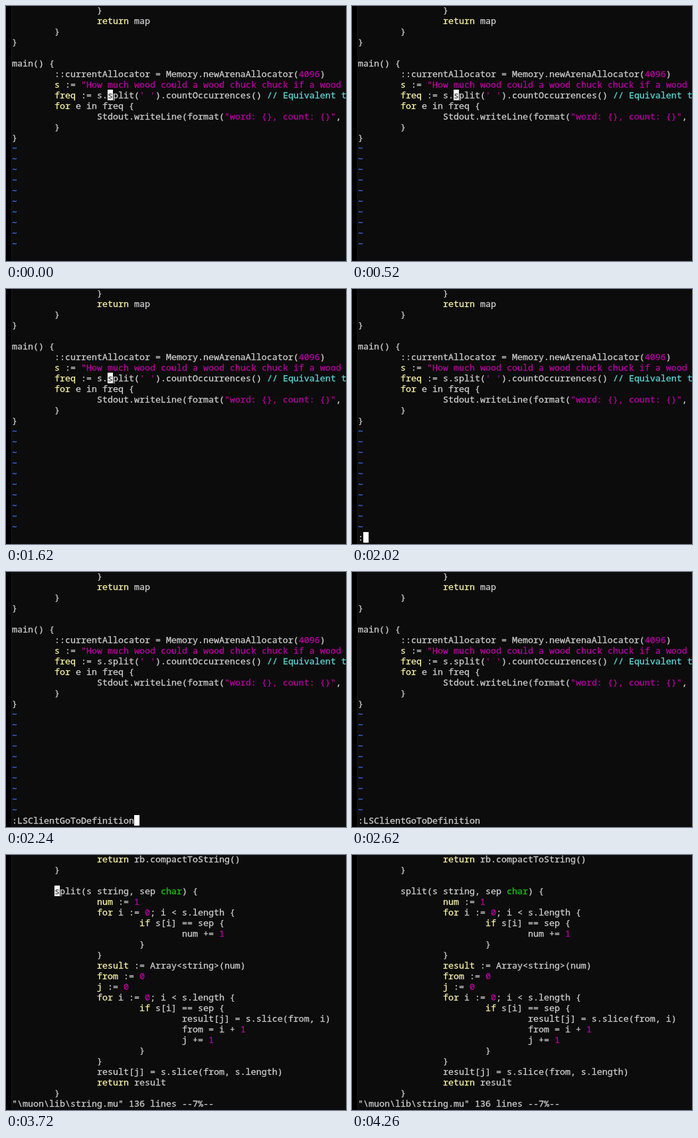
Animation of 512 by 384 pixels, one loop 4490 ms. Source, as an HTML page:

```html
<!DOCTYPE html>
<html lang="en">
<head>
<meta charset="utf-8">
<title>Go to definition</title>
<style>
  html, body { margin: 0; width: 100%; height: 100%; overflow: hidden; background: #0c0c0c; }
  #stage { position: relative; width: 100%; height: 100%; overflow: hidden; contain: strict; background: #0c0c0c; }
  #edge { position: absolute; left: 0; top: 0; width: 8px; height: 100%; background: #000; border-right: 1px solid #181818; }
  pre {
    position: absolute; left: 9px; top: -2px; margin: 0;
    font: 13.3333px/16px "Noto Sans Mono", "DejaVu Sans Mono", monospace;
    font-variant-ligatures: none; tab-size: 8; color: #ccc;
    -webkit-text-stroke: 0.3px;
  }
  #status { top: 366px; }
  #cursor { position: absolute; width: 8px; height: 16px; backdrop-filter: invert(1) brightness(1.06); }
  .constant { color: #b4009e; }
  .comment { color: #61d6d6; }
  .type { color: #16c60c; }
  .statement { color: #f9f1a5; }
  .filler { color: #3b78ff; }
</style>
</head>
<body>
<div id="stage">
<div id="edge"></div>
<pre class="code" id="caller">
		}
		return map
	}
}

main() {
	::currentAllocator = Memory.newArenaAllocator(4096)
	s := "How much wood could a wood chuck chuck if a wood "
	freq := s.split(' ').countOccurrences() // Equivalent to
	for e in freq {
		Stdout.writeLine(format("word: {}, count: {}",
	}
}
~
~
~
~
~
~
~
~
~
~
</pre>
<pre class="code" id="definition">
		return rb.compactToString()
	}

	split(s string, sep char) {
		num := 1
		for i := 0; i &lt; s.length {
			if s[i] == sep {
				num += 1
			}
		}
		result := Array&lt;string&gt;(num)
		from := 0
		j := 0
		for i := 0; i &lt; s.length {
			if s[i] == sep {
				result[j] = s.slice(from, i)
				from = i + 1
				j += 1
			}
		}
		result[j] = s.slice(from, s.length)
		return result
	}
</pre>
<pre id="status"></pre>
<div id="cursor"></div>
</div>
<script>
const LOOP = 4490;
const JUMP = 2860;
const [caller, definition, statusLine, cursor] =
  ["caller", "definition", "status", "cursor"].map(id => document.getElementById(id));

const syntax = new RegExp([
  /(?<constant>"[^"\n]*"|'[^'\n]*'|\b\d+\b)/,
  /(?<comment>\/\/.*)/,
  /(?<type>\bchar\b)/,
  /(?<statement>\b(?:return|for|if)\b|(?<=^\t+)\w+(?= :))/,
  /(?<filler>^~)/
].map(rule => rule.source).join("|"), "gm");

for (const pre of document.querySelectorAll(".code")) {
  pre.innerHTML = pre.innerHTML.replace(syntax, (text, ...rest) => {
    const kind = Object.entries(rest.at(-1)).find(([, match]) => match)[0];
    return `<span class="${kind}">${text}</span>`;
  });
}

// Each entry: start time, cursor column and row (none when blinked off), status text
const command = ":LSClientGoToDefinition";
const fileInfo = String.raw`"\muon\lib\string.mu" 136 lines --7%--`;
const onCall = [18, 8], onName = [8, 3];
const steps = [
  [0, onCall, ""],
  [70, null, ""],
  [520, onCall, ""],
  [1090, null, ""],
  [1620, onCall, ""],
  [2020, [1, 23], ":"],
  [2170, [3, 23], ":LS"],
  [2240, [command.length, 23], command],
  [2620, null, command],
  [JUMP, onName, fileInfo],
  [3160, null, fileInfo],
  [3720, onName, fileInfo],
  [4260, null, fileInfo]
];

function draw(now) {
  const time = now % LOOP;
  const [, cell, status] = steps.findLast(([start]) => start <= time);
  caller.hidden = time >= JUMP;
  definition.hidden = time < JUMP;
  statusLine.textContent = status;
  cursor.hidden = !cell;
  if (cell) {
    cursor.style.left = `${9 + 8 * cell[0]}px`;
    cursor.style.top = `${16 * cell[1] - 2}px`;
  }
}

const origin = performance.now();
function tick() {
  draw(performance.now() - origin);
  requestAnimationFrame(tick);
}
tick();
</script>
</body>
</html>
```
